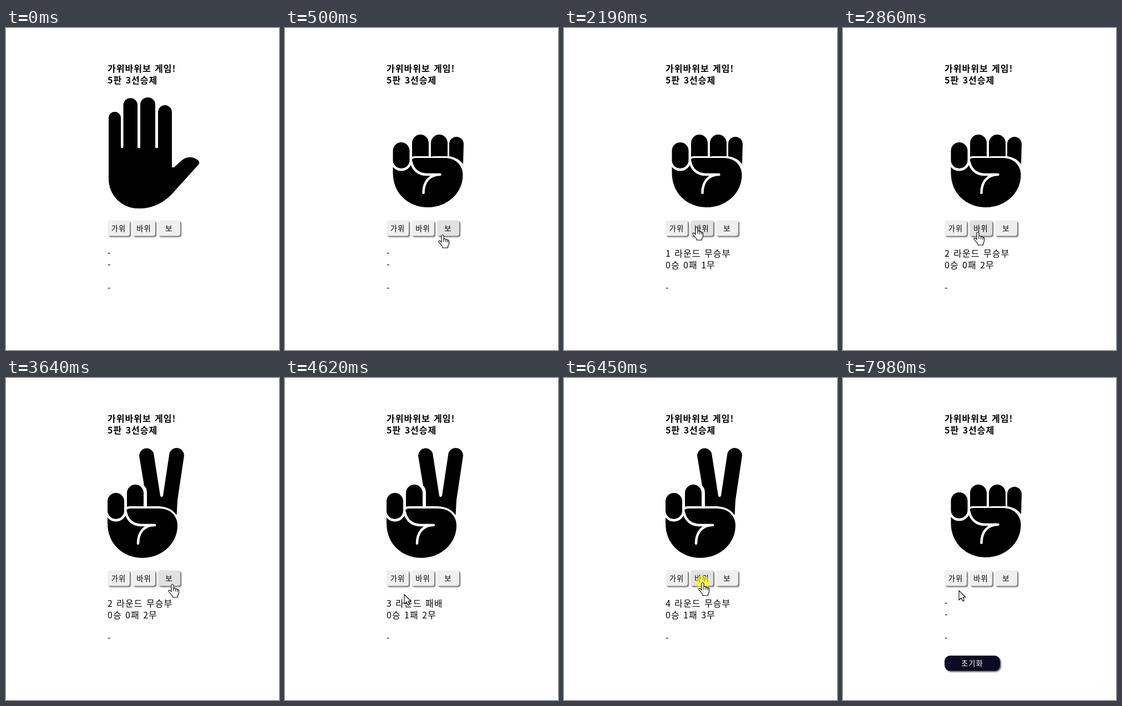
An HTML page for the animation above (8000 ms loop, 492 by 580 pixels).

```html
<!DOCTYPE html>
<html lang="ko">
<head>
<meta charset="utf-8">
<title>가위바위보</title>
<style>
  html, body { margin: 0; width: 100%; height: 100%; overflow: hidden; background: #fff; }
  svg { display: block; width: 492px; height: 580px; }
  text { font: 16px "Noto Sans CJK KR", "Noto Sans CJK", sans-serif; letter-spacing: 1px; word-spacing: 1px; white-space: pre; }
  .title { font-weight: 700; }
  .btn rect { fill: #efefef; filter: drop-shadow(2px 2px 1.2px #666); }
  .btn.over rect { fill: #e1e1e1; }
  .btn text { font-size: 13.33px; text-anchor: middle; }
  .reset rect { fill: #0a0a23; }
  .reset.over rect { fill: #25253f; }
  .reset text { fill: #fff; }
  .line { fill: none; stroke: #fff; stroke-width: 4.5; stroke-linecap: round; stroke-linejoin: round; }
  .pinky { stroke: #fff; stroke-width: 9; paint-order: stroke; }
  .cursor path { fill: #fff; stroke: #000; stroke-width: 1.1; stroke-linejoin: round; }
  .cursor .fold { fill: none; }
</style>
</head>
<body>
<svg viewBox="0 0 492 580">
  <defs>
    <g id="fist">
      <path d="M183 245V262C183 300 212 324 246 324C281 324 309 298 309 266C309 248 296 235 276 235H224Q214 235 214 245Z"/>
      <path class="line" d="M216 242C219 257 230 265 244 265H268C248 265 238 279 238 298"/>
      <rect class="pinky" x="183" y="207" width="30" height="47" rx="15"/>
    </g>
    <path id="finger" d="M0 40V15a15 15 0 0 1 30 0V39H6Q2 39 0 40Z"/>
  </defs>

  <text class="title" x="183" y="79">가위바위보 게임!</text>
  <text class="title" x="183" y="100">5판 3선승제</text>

  <g class="hand">
    <use href="#finger" x="229" y="192"/>
    <use href="#finger" x="263" y="192"/>
    <path d="M296 231V209a13 13 0 0 1 26 0L321 245Q311 233 296 231Z"/>
    <use href="#fist" x="11.5" y="-1"/>
  </g>
  <g class="hand">
    <path d="M240 140A13.5 13.5 0 0 1 266 135L278 212Q280 217 283 212L294.5 136A13.5 13.5 0 0 1 321 140L309 220L307.5 247Q297 232 275 231H254V208Q254 198 249 194Z"/>
    <use href="#finger" x="218" y="192"/>
    <use href="#fist"/>
  </g>
  <g class="hand">
    <path d="M185 162a11 11 0 0 1 22 0V214a2.2 2.2 0 0 0 4.5 0V138a12.8 13 0 0 1 25.5 0V214a2.5 2.5 0 0 0 5 0V138a13.5 13 0 0 1 27 0V214a2.5 2.5 0 0 0 5 0V152a12.5 13 0 0 1 25 0V251h4L316 239Q330 227 346 238Q350 242 347 246L299 299Q276 323 245 325H238A53 53 0 0 1 185 272Z"/>
  </g>

  <g class="btn"><rect x="183" y="346.500" width="40" height="28" rx="4"/><text x="203" y="366">가위</text></g>
  <g class="btn"><rect x="228" y="346.500" width="41" height="28" rx="4"/><text x="248.500" y="366">바위</text></g>
  <g class="btn"><rect x="274" y="346.500" width="40" height="28" rx="4"/><text x="294" y="366">보</text></g>

  <text class="out" x="183" y="412"/>
  <text class="out" x="183" y="433"/>
  <text class="out" x="183" y="475"/>

  <g class="btn reset"><rect x="183" y="500" width="100" height="27.500" rx="10"/><text x="233" y="519">초기화</text></g>

  <circle class="click" r="12" fill="#ff0" opacity=".6"/>
  <g class="cursor">
    <path d="M0 0V17L4 13.200L6.800 19L9.500 17.800L6.900 12H12Z"/>
  </g>
  <g class="cursor">
    <path d="M-2 2Q0-1 2 2V8Q5 6.500 5.700 9Q8 8 9 10Q11.500 9.500 11.500 12V16Q11.500 19 9.500 21V24H0V22L-6.500 14Q-8 11.500-6 11Q-4 11-2 14Z"/>
    <path class="fold" d="M2 8v5M5.700 9v4.500M9 10v4"/>
  </g>
</svg>
<script>
const LOOP = 8000, TICK = 50, ROCK = 0, SCISSORS = 1, PAPER = 2;
const all = s => [...document.querySelectorAll(s)];
const show = (el, on) => el.style.display = on ? '' : 'none';

// Shuffling spells: start, first hand, stop
const runs = [
  [-32, PAPER, 1125], [2120, PAPER, 2490], [3488, SCISSORS, 3820],
  [4850, PAPER, 5140], [6185, PAPER, 6480], [7628, PAPER, LOOP]
];
// Score lines: time, round, record, verdict
const scores = [
  [0, '-', '-', '-'],
  [1125, '1 라운드 무승부', '0승 0패 1무', '-'],
  [2490, '2 라운드 무승부', '0승 0패 2무', '-'],
  [3820, '3 라운드 패배', '0승 1패 2무', '-'],
  [5140, '4 라운드 무승부', '0승 1패 3무', '-'],
  [6480, '5 라운드 승리', '1승 1패 3무', '최종 무승부'],
  [7590, '-', '-', '-']
];
// Pointer moves: start, end, control point, end point
const moves = [
  [30, 830, 310, 384, 197, 351],
  [1620, 1960, 252, 358, 239, 358],
  [2730, 3480, 262, 417, 300, 371],
  [4030, 4820, 225, 437, 208, 373],
  [5390, 6190, 215, 410, 250, 368],
  [6760, 7190, 258, 450, 237, 520],
  [7610, 7980, 232, 440, 209, 383]
];
const clickEnds = [1130, 2500, 3830, 5170, 6510, 7610];

const hands = all('.hand'), outs = all('.out'), btns = all('.btn');
const [arrow, pointer] = all('.cursor'), [click] = all('.click');
const boxes = btns.map(b => {
  const r = b.querySelector('rect');
  return ['x', 'y', 'width', 'height'].map(k => +r.getAttribute(k));
});

const latest = (list, t) => list.filter(e => e[0] <= t).pop();

function handAt(t) {
  const [start, first, stop] = latest(runs, t);
  return (first + Math.floor((Math.min(t, stop - 1) - start) / TICK)) % 3;
}

function pointerAt(t) {
  let pos = [453, 391];
  for (const [a, b, cx, cy, x, y] of moves) {
    if (t < a) break;
    const p = Math.min(1, (t - a) / (b - a));
    const u = p * p * (3 - 2 * p), v = 1 - u;
    pos = [[cx, x], [cy, y]].map(([c, e], i) => v * v * pos[i] + 2 * u * v * c + u * u * e);
  }
  return pos.map(Math.round);
}

function draw(t) {
  const hand = handAt(t);
  hands.forEach((h, i) => show(h, i === hand));

  const score = latest(scores, t);
  outs.forEach((o, i) => o.textContent = score[i + 1]);
  const resetOn = t >= 6480;
  show(btns[3], resetOn);

  const [x, y] = pointerAt(t), inView = t >= 30;
  let over = false;
  btns.forEach((b, i) => {
    const [bx, by, w, h] = boxes[i];
    const hit = inView && (i < 3 || resetOn) && x >= bx && x <= bx + w && y >= by && y <= by + h;
    b.classList.toggle('over', hit);
    over = over || hit;
  });
  show(arrow, inView && !over);
  show(pointer, inView && over);
  show(click, clickEnds.some(e => t >= e - 90 && t < e));
  for (const el of [arrow, pointer, click]) el.setAttribute('transform', `translate(${x} ${y})`);
}

const begin = performance.now();
function frame() {
  draw((performance.now() - begin) % LOOP);
  requestAnimationFrame(frame);
}
draw(0);
requestAnimationFrame(frame);
</script>
</body>
</html>
```
